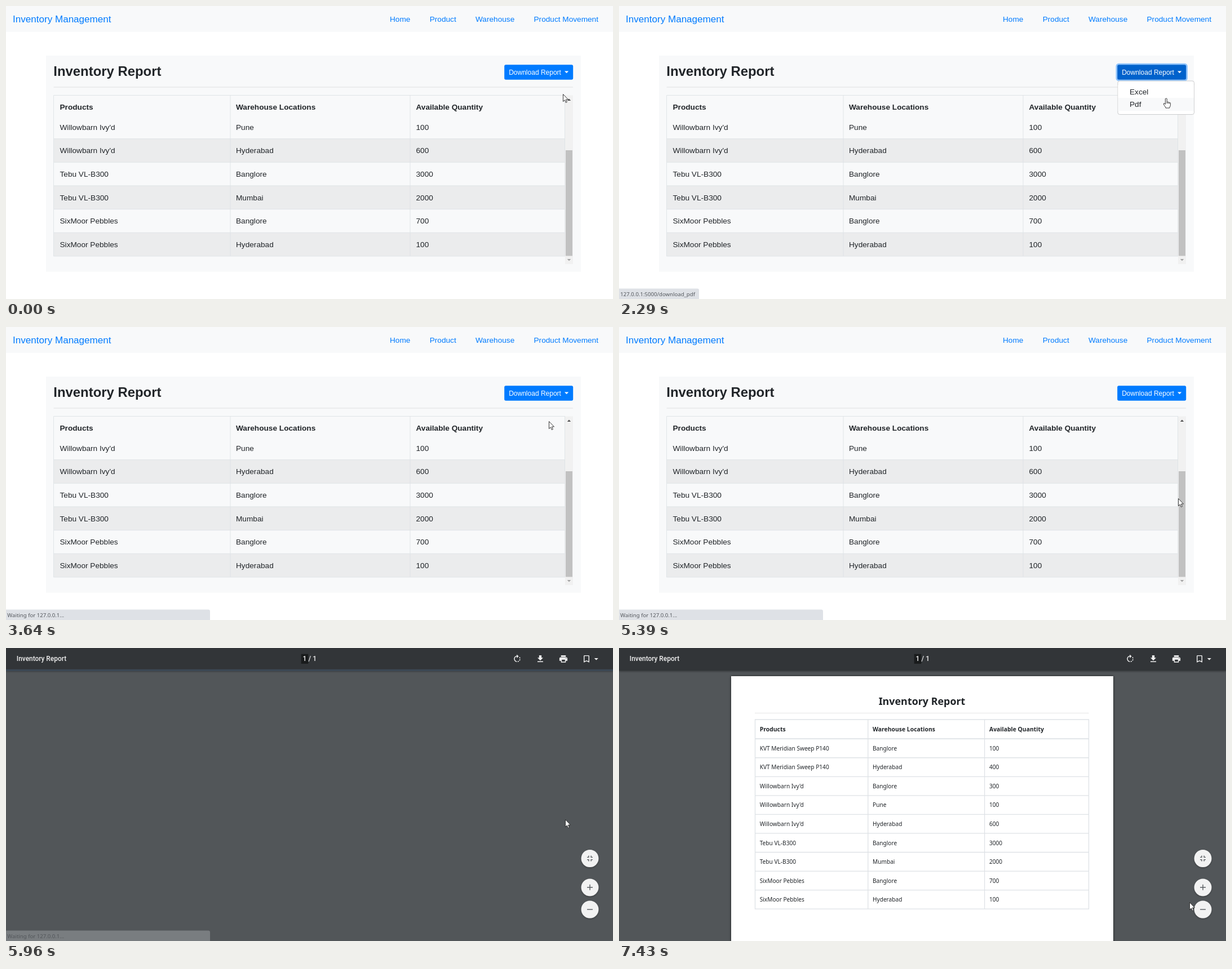
Write an HTML page that moves like this. It is 1077x520 px and loops after 7.5 s.

```html
<!DOCTYPE html>
<html lang="en">
<head>
<meta charset="utf-8">
<title>Inventory Report</title>
<style>
  html, body { margin: 0; width: 100%; height: 100%; overflow: hidden; background: #fff; }
  svg { display: block; width: 1077px; height: 520px; }
  .web { font: 13.65px "Liberation Sans", Arial, sans-serif; fill: #212529; }
  .link { fill: #007bff; }
  .bold { font-weight: 700; }
  .doc { font: 10.15px "Noto Sans", "Open Sans", sans-serif; fill: #212529; }
  .bar { font: 500 11.95px Roboto, sans-serif; fill: #f1f1f1; }
  .status { font: 9.6px "Noto Sans", "Open Sans", sans-serif; fill: #54585d; }
</style>
</head>
<body>
<svg id="stage" viewBox="0 0 1077 520" xmlns="http://www.w3.org/2000/svg"></svg>
<script>
const LOOP = 7500;
const A = "Willowbarn Ivy'd", B = "Tebu VL-B300", C = "SixMoor Pebbles", D = "KVT Meridian Sweep P140";
const HEAD = ["Products", "Warehouse Locations", "Available Quantity"];
const STOCK = [
  [D, "Banglore", 100], [D, "Hyderabad", 400], [A, "Banglore", 300],
  [A, "Pune", 100], [A, "Hyderabad", 600], [B, "Banglore", 3000],
  [B, "Mumbai", 2000], [C, "Banglore", 700], [C, "Hyderabad", 100]
];
const ICON = {
  rotate: "M15.55 5.55L11 1v3.07C7.06 4.56 4 7.92 4 12s3.05 7.44 7 7.93v-2.02c-2.84-.48-5-2.94-5-5.91s2.16-5.43 5-5.91V10l4.55-4.45zM19.93 11c-.17-1.39-.72-2.73-1.62-3.89l-1.42 1.42c.54.75.88 1.6 1.02 2.47h2.02zM13 17.9v2.02c1.39-.17 2.74-.71 3.9-1.61l-1.44-1.44c-.75.54-1.59.89-2.46 1.03zm3.89-2.42l1.42 1.41c.9-1.16 1.45-2.5 1.62-3.89h-2.02c-.14.87-.48 1.72-1.02 2.48z",
  save: "M19 9h-4V3H9v6H5l7 7 7-7zM5 18v2h14v-2H5z",
  print: "M19 8H5c-1.66 0-3 1.34-3 3v6h4v4h12v-4h4v-6c0-1.66-1.34-3-3-3zm-3 11H8v-5h8v5zm3-7c-.55 0-1-.45-1-1s.45-1 1-1 1 .45 1 1-.45 1-1 1zm-1-9H6v4h12V3z",
  mark: "M17 3H7c-1.1 0-2 .9-2 2v16l7-3 7 3V5c0-1.1-.9-2-2-2zm0 15l-5-2.18L7 18V5h10v13z",
  caret: "M7 10l5 5 5-5z",
  fit: "M5 16h3v3h2v-5H5v2zm3-8H5v2h5V5H8v3zm6 11h2v-3h3v-2h-5v5zm2-11V5h-2v5h5V8h-3z",
  plus: "M19 13h-6v6h-2v-6H5v-2h6V5h2v6h6v2z",
  minus: "M19 13H5v-2h14v2z"
};

const text = (x, y, s, more = "") => `<text x="${x}" y="${y}" ${more}>${s}</text>`;
const rect = (x, y, w, h, fill, more = "") =>
  `<rect x="${x}" y="${y}" width="${w}" height="${h}" fill="${fill}" ${more}/>`;
const lines = (d, stroke, width = 1) => `<path d="${d}" stroke="${stroke}" stroke-width="${width}" fill="none"/>`;
const icon = (name, x, y, fill) =>
  `<path d="${ICON[name]}" fill="${fill}" transform="translate(${x} ${y}) scale(.711) translate(-12 -12)"/>`;
const cells = (xs, y, row, more) => row.map((s, i) => text(xs[i], y, s, more)).join("");

function webPage() {
  const xs = [95.5, 408, 727.5], pitch = 41.65;
  let rows = "", grid = "M84.5 444V158.5H992M398 158.5V444M717 158.5V444M991.5 158.5V444";
  STOCK.slice(3).forEach((row, i) => {
    const y = 194 + i * pitch;
    if (i % 2) rows += rect(84.5, y, 907.5, pitch, "#ebeced");
    if (i) grid += `M84.5 ${y}H992`;
    rows += cells(xs, y + 25.8, row);
  });
  const nav = [[681, "Home"], [751.7, "Product"], [833, "Warehouse"], [936.5, "Product Movement"]];
  return rect(0, 0, 1077, 520, "#fff") + rect(0, 0, 1077, 46, "#f8f9fa")
    + text(12, 29, "Inventory Management", 'class="link" font-size="17.07"')
    + nav.map(([x, s]) => text(x, 27.6, s, 'class="link"')).join("")
    + rect(71, 88, 949, 383.5, "#f8f9fa")
    + text(84.3, 123.8, "Inventory Report", 'class="bold" font-size="23.9"')
    + lines("M84.5 144H1006", "#dfe0e1")
    + rows + cells(xs, 184.3, HEAD, 'class="bold"')
    + lines(grid + "M84.5 444H992", "#dee2e6", .9)
    + rect(992, 158.5, 14, 299.5, "#f1f1f1") + rect(993, 256, 12, 187.5, "#c1c1c1")
    + '<path d="M995.8 168h6.4l-3.2-3.5z" fill="#505050"/><path d="M995.8 449h6.4l-3.2 3.5z" fill="#a3a3a3"/>'
    + '<rect id="ring" x="882.9" y="103" width="124.6" height="29" rx="3.8" fill="none" stroke="#8fc4fc" stroke-width="2.7"/>'
    + '<rect id="button" x="884.2" y="104.3" width="122" height="26.4" rx="2.7"/>'
    + text(892.2, 122.2, "Download Report", 'font-size="12" fill="#fff"')
    + '<path d="M991 115.6h7.2l-3.6 3.6z" fill="#fff"/>'
    + '<g id="menu">' + rect(885, 133, 135.5, 59.5, "#fff", 'rx="3.4" stroke="#c6c7c8" stroke-width=".9"')
    + '<rect id="excelBg" x="885.4" y="140.2" width="134.7" height="23" /><rect id="pdfBg" x="885.4" y="163.2" width="134.7" height="23"/>'
    + text(906, 156.5, "Excel") + text(906, 179.2, "Pdf", 'id="pdf"') + "</g>";
}

function paper() {
  const xs = [249.7, 450, 657], pitch = 33.55;
  let rows = "", grid = "M241.5 127H833.5V463.2H241.5ZM441.8 127V463M648.6 127V463";
  STOCK.forEach((row, i) => {
    const y = 161.2 + i * pitch;
    if (i) grid += `M241.5 ${y}H833.5`;
    rows += cells(xs, y + 20.6, row);
  });
  return rect(199, 50, 678, 500, "#fff", 'filter="url(#edge)"')
    + text(537.5, 101.3, "Inventory Report", 'class="bold" font-size="17.9" text-anchor="middle"')
    + lines("M241 115.5H833.5", "#e5e5e5")
    + cells(xs, 147.8, HEAD, 'class="bold" font-size="10.4"') + rows
    + lines(grid, "#dee2e6", 1.3) + lines("M241.5 161.2H833.5", "#dee2e6", 1.8);
}

function viewer() {
  const tools = [["rotate", 907], ["save", 948], ["print", 989], ["mark", 1030], ["caret", 1047.3]];
  const rounds = [["fit", 373.5], ["plus", 424.8], ["minus", 464]];
  return rect(0, 0, 1077, 520, "#525659")
    + `<g id="paper" class="doc">${paper()}</g><g id="chrome">`
    + rect(0, 0, 1077, 40.5, "#323639", 'filter="url(#drop)"')
    + rect(0, 37.8, 1077, 3.2, "#3c4855", 'id="progress"')
    + '<g class="bar">' + text(18.8, 23.4, "Inventory Report")
    + rect(523.7, 10.7, 12.6, 17.2, "#191b1c") + text(530, 23.4, "1", 'text-anchor="middle"')
    + text(536.6, 23.4, "/ 1") + "</g>"
    + tools.map(([n, x]) => icon(n, x, 19.3, "#f1f1f1")).join("")
    + rounds.map(([n, y]) => `<circle cx="1036" cy="${y}" r="15.4" fill="#f2f2f2" filter="url(#drop)"/>`
      + icon(n, 1036, y, "#5a5e62")).join("") + "</g>";
}

const stage = document.getElementById("stage");
stage.innerHTML = `<defs>
  <filter id="drop" x="-20%" y="-20%" width="140%" height="150%"><feDropShadow dx="0" dy="1.2" stdDeviation="1.5" flood-opacity=".35"/></filter>
  <filter id="edge" x="-5%" y="-5%" width="110%" height="110%"><feDropShadow dx="0" dy="0" stdDeviation="2" flood-opacity=".65"/></filter></defs>
  <g id="web" class="web">${webPage()}</g><g id="viewer">${viewer()}</g>
  <g id="status" class="status"><path id="statusBg" fill="#dee1e6"/>${text(2.3, 514.8, "", 'id="statusText"')}</g>
  <path id="arrow" d="M.5 .6V13.6L3.4 10.8L5.3 15.4L7.4 14.5L5.5 10H9.5Z" fill="#fff" stroke="#222" stroke-width=".9"/>
  <g id="hand" stroke="#222" stroke-width=".9" stroke-linejoin="round"><path fill="#fff" d="M-1.4 1.2Q0 -.4 1.4 1.2V7Q2.6 6 3.6 7.4Q4.8 6.6 5.8 8Q7.4 7.4 7.7 9.2V12Q7.7 14.5 6 16.6V17.6H-.8V16.6Q-3.6 13 -4.6 10.6Q-4.4 8.6 -2.7 9.6L-1.4 11Z"/><path fill="none" d="M1.4 7V9.6M3.6 7.4V9.9M5.8 8V10.2"/></g>`;

const el = {};
stage.querySelectorAll("[id]").forEach(e => el[e.id] = e);
const set = (id, name, value) => el[id].setAttribute(name, value);
const show = (id, on) => set(id, "display", on ? "inline" : "none");

// Share of a stepped move done at time t: n pictures, first at a, last at b.
function stepped(t, a, b, n) {
  if (t < a) return 0;
  return Math.min(n, Math.floor((t - a) * (n - 1) / (b - a) + 1e-6) + 1) / n;
}

const MOVES = [
  [50, 390, 5, 988, 120], [1520, 2210, 10, 976, 161], [2290, 2610, 5, 963, 167],
  [5100, 5390, 5, 992, 304], [6180, 6490, 5, 990, 342], [6790, 7040, 4, 984, 387],
  [7350, 7430, 2, 1012, 451]
];

function pointer(t) {
  let x = 988, y = 156;
  for (const [a, b, n, toX, toY] of MOVES) {
    const k = 1 - Math.pow(1 - stepped(t, a, b, n), 2.3);
    x += (toX - x) * k;
    y += (toY - y) * k;
  }
  return [x, y];
}

function statusAt(t, overExcel, overPdf) {
  const host = "127.0.0.1:5000/";
  if (t >= 3550) {
    const fade = t < 5785 ? 1 : t < 5870 ? .85 : t < 5960 ? .6 : t < 6040 ? .28 : 0;
    return ["Waiting for 127.0.0.1...", t < 3640 ? 142 : 362, fade];
  }
  if (overPdf) return [host + "download_pdf", 142, 1];
  if (overExcel) return [host + "excel", 104, 1];
  return ["", 0, 0];
}

function draw(t) {
  const [x, y] = pointer(t);
  const menu = t >= 827 && t < 3230;
  const onButton = t < 3160 && y < 131;
  const overExcel = menu && y >= 140 && y < 163.2;
  const overPdf = t < 3550 && t > 2200 && y >= 163.2;
  const pressed = t >= 2900;

  show("web", t < 5470);
  show("viewer", t >= 5470);
  show("chrome", t >= 5700);
  show("progress", t < 6040);
  show("paper", t >= 6040);

  const blue = t >= 3320 ? "#007bff" : t >= 3230 ? "#006fe6" : t >= 750 ? "#0062cc" : onButton ? "#0069d9" : "#007bff";
  set("button", "fill", blue);
  set("ring", "opacity", t < 750 || t >= 2990 ? 0 : t < 827 || t >= 2900 ? .5 : 1);
  show("menu", menu);
  set("excelBg", "fill", overExcel ? "#f8f9fa" : "#fff");
  set("pdfBg", "fill", pressed ? "#007bff" : overPdf ? "#f8f9fa" : "#fff");
  set("pdf", "fill", pressed ? "#fff" : "#212529");

  const [label, width, fade] = statusAt(t, overExcel, overPdf);
  set("status", "opacity", fade);
  set("statusBg", "d", `M0 501.6H${Math.max(0, width - 3)}q3 0 3 3V520H0Z`);
  el.statusText.textContent = label;

  const hand = t < 3160 && (onButton || overExcel || overPdf);
  show("hand", hand);
  show("arrow", !hand);
  set(hand ? "hand" : "arrow", "transform", `translate(${x} ${y})`);
}

const start = performance.now();
function tick(now) {
  draw(Math.max(0, now - start) % LOOP);
  requestAnimationFrame(tick);
}
draw(0);
requestAnimationFrame(tick);
</script>
</body>
</html>
```
